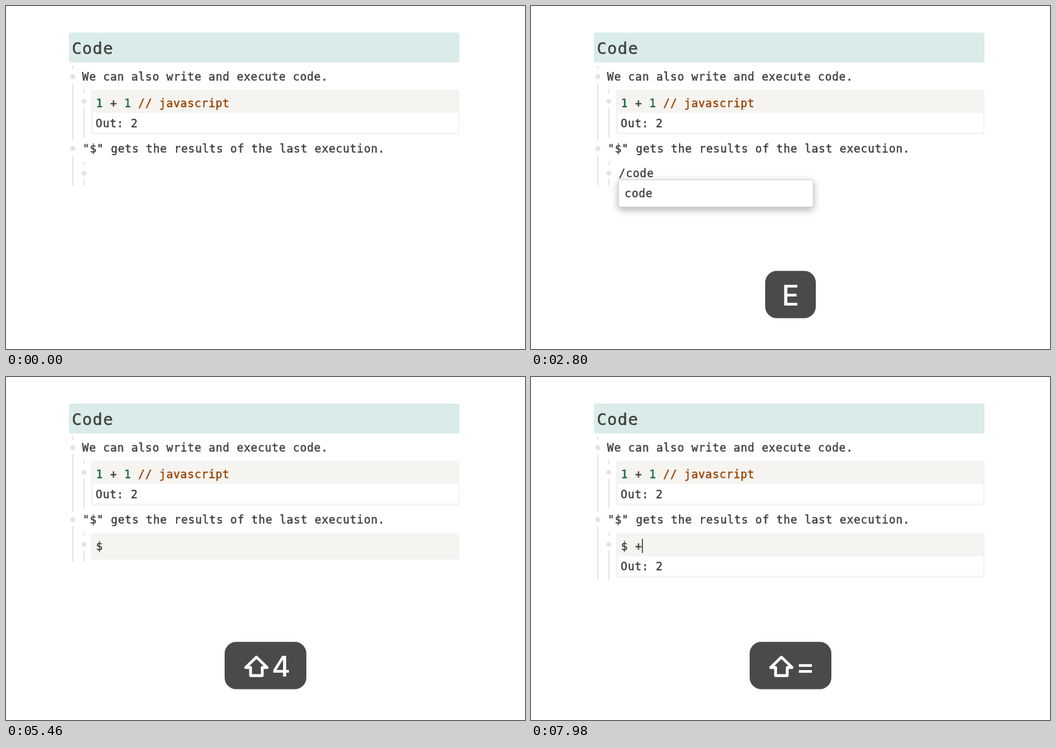
An HTML page that plays this animation: 800 by 529 pixels, repeating every 8 s.

```html
<!DOCTYPE html>
<html lang="en">
<head>
<meta charset="utf-8">
<title>Code notes</title>
<style>
  html, body { margin: 0; width: 100%; height: 100%; overflow: hidden; background: #fff; }
  svg { display: block; width: 800px; height: 529px; }
  text {
    font: 17px "DejaVu Sans Mono", monospace; letter-spacing: .6px; white-space: pre;
    fill: #404040; stroke: #404040; stroke-width: .45px;
  }
  .title { font-size: 25px; letter-spacing: 1px; }
  .number { fill: #164; stroke: #164; }
  .comment { fill: #940; stroke: #940; }
  .cap { font: 500 44px Inter, sans-serif; letter-spacing: 0; fill: #fff; stroke: none; text-anchor: middle; }
  .icon { fill: none; stroke: #fff; stroke-width: 4.4; stroke-linecap: round; stroke-linejoin: round; }
  .guide { fill: none; stroke: #e6e6e6; stroke-width: 2; }
  .bullet { fill: #e3e3e3; }
  .code { fill: #f6f4f1; }
  .popup { fill: #fff; stroke: #cfcfcf; filter: drop-shadow(0 4px 6px rgba(0, 0, 0, .3)); }
</style>
</head>
<body>
<svg id="stage" viewBox="0 0 800 529"></svg>
<script>
const LOOP = 8000, CHAR = 10.836, FADE = 200;
const stage = document.getElementById("stage");

const text = (x, y, s, cls = "") => `<text x="${x}" y="${y}" class="${cls}">${s}</text>`;
const rect = (x, y, w, h, r, attrs) =>
  `<rect x="${x}" y="${y}" width="${w}" height="${h}" rx="${r}" ${attrs}/>`;
const guide = (x, top, bottom) => `<path class="guide" d="M${x} ${top}V${bottom}"/>`;
const bullet = (x, y) => `<circle class="bullet" cx="${x}" cy="${y}" r="3.8"/>`;
const caret = (x, y) => rect(x, y, 1.3, 22, 0, 'fill="#222"');

// Key glyphs, placed relative to the centre of the key
const cap = (s, x = 0) => text(400 + x, 462, s, "cap");
const icon = (d, x = 0) => `<path class="icon" transform="translate(${400 + x} 446)" d="${d}"/>`;
const shift = icon("M0 -14L16.5 2H9V14.5H-9V2H-16.5Z", -14);
const enter = x => icon("M4 -15H12Q17 -15 17 -10V-1Q17 4 12 4H-16M-7 -5L-17 4L-7 14", x);
const command = [0, 90, 180, 270].map(a =>
  `<path class="icon" transform="translate(376.5 446.5) rotate(${a})"
    d="M5.5 0V-10A4.5 4.5 0 1 1 10 -5.5H0"/>`).join("");
const space = icon("M-15 5V12H15V5");

const keys = [
  { at: 910, width: 68, glyph: cap("/") },
  { at: 1680, width: 84, glyph: cap("C") },
  { at: 2100, width: 86, glyph: cap("O") },
  { at: 2450, width: 84, glyph: cap("D") },
  { at: 2800, width: 78, glyph: cap("E") },
  { at: 3150, until: 3850, width: 99, glyph: enter(0) },
  { at: 4900, until: 5740, width: 126, glyph: shift + cap("4", 24) },
  { at: 6230, until: 7070, width: 141, glyph: command + enter(21) },
  { at: 7420, width: 99, glyph: space },
  { at: 7770, width: 126, glyph: shift + cap("=", 23) },
];

// Typed line and the time each state begins
const typed = [
  [0, ""], [910, "/"], [1680, "/c"], [2100, "/co"], [2450, "/cod"], [2800, "/code"],
  [3150, ""], [4900, "$"], [7420, "$ "], [7770, "$ +"],
];
const BLOCK_AT = 3150, RUN_AT = 6230;
const commands = ["space", "code", "javascript", "html", "css", "text", "render", "note"];
const latest = (list, test) => list.filter(test).pop();

function page() {
  return rect(97, 41, 602, 46, 3, 'fill="#d9ece9"') + text(101.5, 74, "Code", "title") +
    guide(103, 92, 97) + bullet(103, 109) + guide(103, 119, 208) +
    text(117.3, 114.5, "We can also write and execute code.") +
    guide(120, 128, 134) + bullet(120, 147) + guide(120, 156, 203) +
    codeBlock(129, true) +
    text(138.8, 155.5, '<tspan class="number">1</tspan> + <tspan class="number">1</tspan> ' +
      '<tspan class="comment">// javascript</tspan>') +
    bullet(103, 220) + text(118.3, 226, '"$" gets the results of the last execution.') +
    guide(120, 240, 245) + bullet(120, 258);
}

function codeBlock(y, hasOutput) {
  if (!hasOutput) return rect(131, y, 568, 41, 3, 'class="code"');
  return rect(131, y, 568, 69, 3, 'class="code"') +
    rect(134, y + 36, 563, 30, 1, 'fill="#fff"') + text(138.3, y + 57.5, "Out: 2");
}

function popup(query) {
  const items = commands.filter(c => c.startsWith(query));
  const full = items.length > 7;
  const height = full ? 199 : 16 + 26 * items.length;
  let s = rect(135, 268, 300, height, 2, 'class="popup"') +
    `<clipPath id="list"><rect x="135" y="268" width="300" height="${height}"/></clipPath><g clip-path="url(#list)">`;
  items.forEach((name, i) => {
    s += text(144.3, 295 + 26 * i, name);
    if (i) s += rect(143, 275.5 + 26 * i, 284, 1.5, 0, 'fill="#e8e8e8"');
  });
  if (full) s += rect(425, 270, 7.5, 56, 3.7, 'fill="#777"');
  return s + "</g>";
}

function keyCap(t) {
  const key = latest(keys, k => k.at <= t);
  if (!key) return "";
  const opacity = key.until ? Math.min(1, Math.max(0, 1 - (t - key.until) / FADE)) : 1;
  return `<g opacity="${opacity}">` +
    rect(400 - key.width / 2, 408.5, key.width, 73, 18, 'fill="#4a4a4a"') + key.glyph + "</g>";
}

function codeCaretOn(t) {
  if (t < 3920) return false;
  if (t >= 7420) return true;
  return Math.floor((t - 7000) / 530) % 2 === 0;
}

function draw(t) {
  const line = latest(typed, e => e[0] <= t)[1];
  const inBlock = t >= BLOCK_AT, ran = t >= RUN_AT;
  const bottom = ran ? 313 : inBlock ? 285 : 277;
  let s = page() + guide(103, 230, bottom) + guide(120, 267, bottom);
  if (inBlock) {
    s += codeBlock(240.5, ran) + text(138.8, 267, line);
    if (codeCaretOn(t)) s += caret(138.5 + CHAR * line.length, 249.5);
  } else {
    s += text(135.3, 263.5, line);
    if (line) s += popup(line.slice(1));
    else if (t >= 170 && t < 700) s += caret(134.5, 246);
  }
  stage.innerHTML = s + keyCap(t);
}

function tick() {
  draw(performance.now() % LOOP);
  requestAnimationFrame(tick);
}
tick();
</script>
</body>
</html>
```
